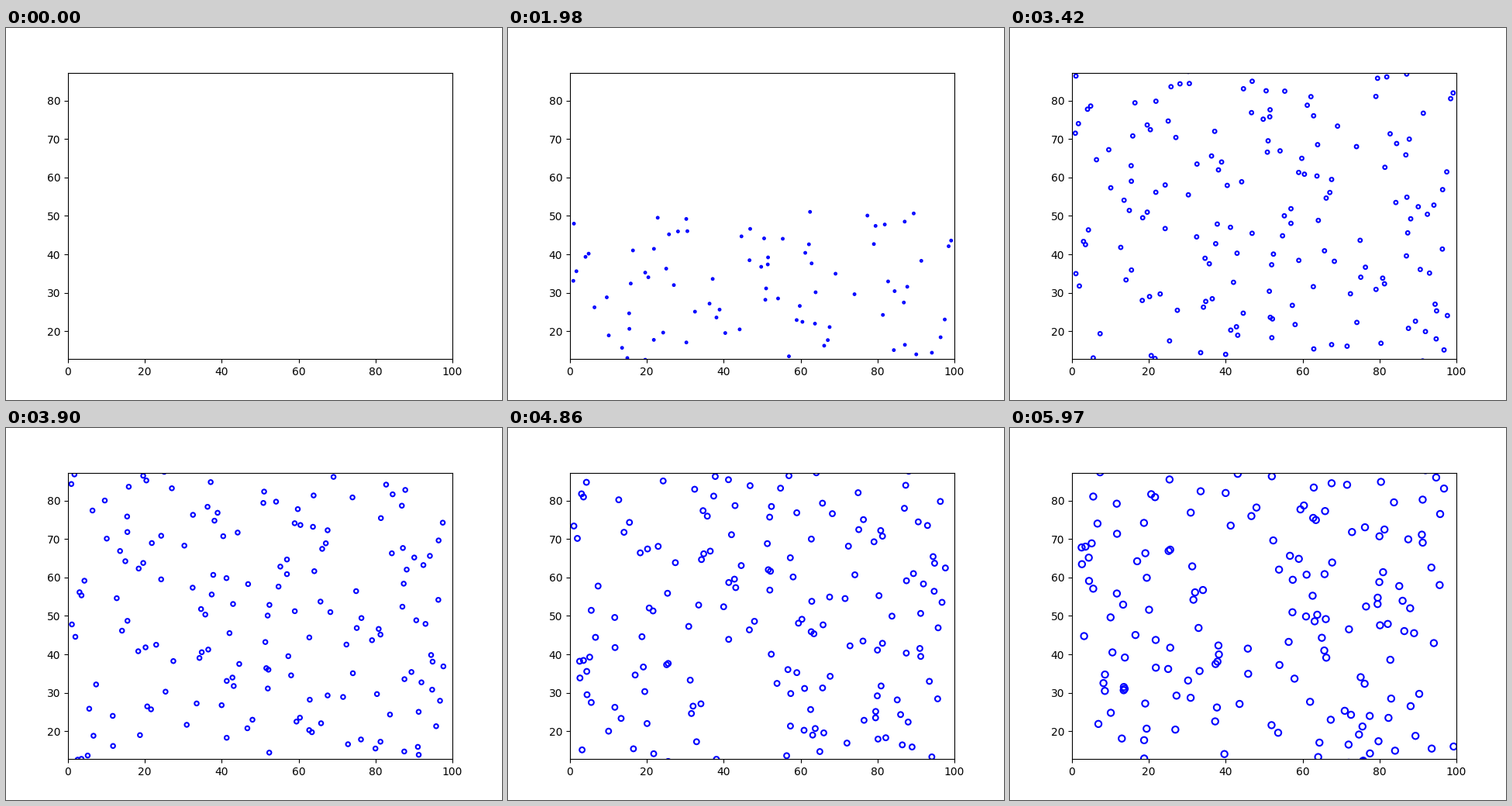
These frames come from a looping animation (640 by 480 pixels, 6 s). A matplotlib script:

```python
import numpy as np
import matplotlib.pyplot as plt
from matplotlib.animation import FuncAnimation

FRAMES = 200
INTERVAL = 30             # ms
RISE = 0.8                # data units per frame
GROWTH = 0.03             # marker diameter in points per frame
HALF = 50 * 369.6 / 496   # half the visible height at equal aspect

COUNT = 310
FIRST = 1.5               # depth of the leading bubble below zero
GAP = 0.48                # mean depth between bubbles

# One bubble per thin layer of depth, at a random place in it
rng = np.random.default_rng(7)
x = rng.uniform(0.5, 99.6, COUNT)
depth = FIRST + GAP * (np.arange(COUNT) + rng.random(COUNT))
start = np.column_stack([x, -depth])

fig, ax = plt.subplots(figsize=(6.4, 4.8), dpi=100)
ax.set_xlim(0, 100)
ax.set_ylim(50 - HALF, 50 + HALF)
bubbles = ax.scatter(start[:, 0], start[:, 1], s=0,
                     facecolors="none", edgecolors="blue", linewidths=1.5)


def update(frame):
    bubbles.set_offsets(start + (0, RISE * frame))
    bubbles.set_sizes([(GROWTH * frame) ** 2])
    return bubbles,


anim = FuncAnimation(fig, update, frames=FRAMES, interval=INTERVAL,
                     repeat=True, repeat_delay=0)
plt.show()
```
